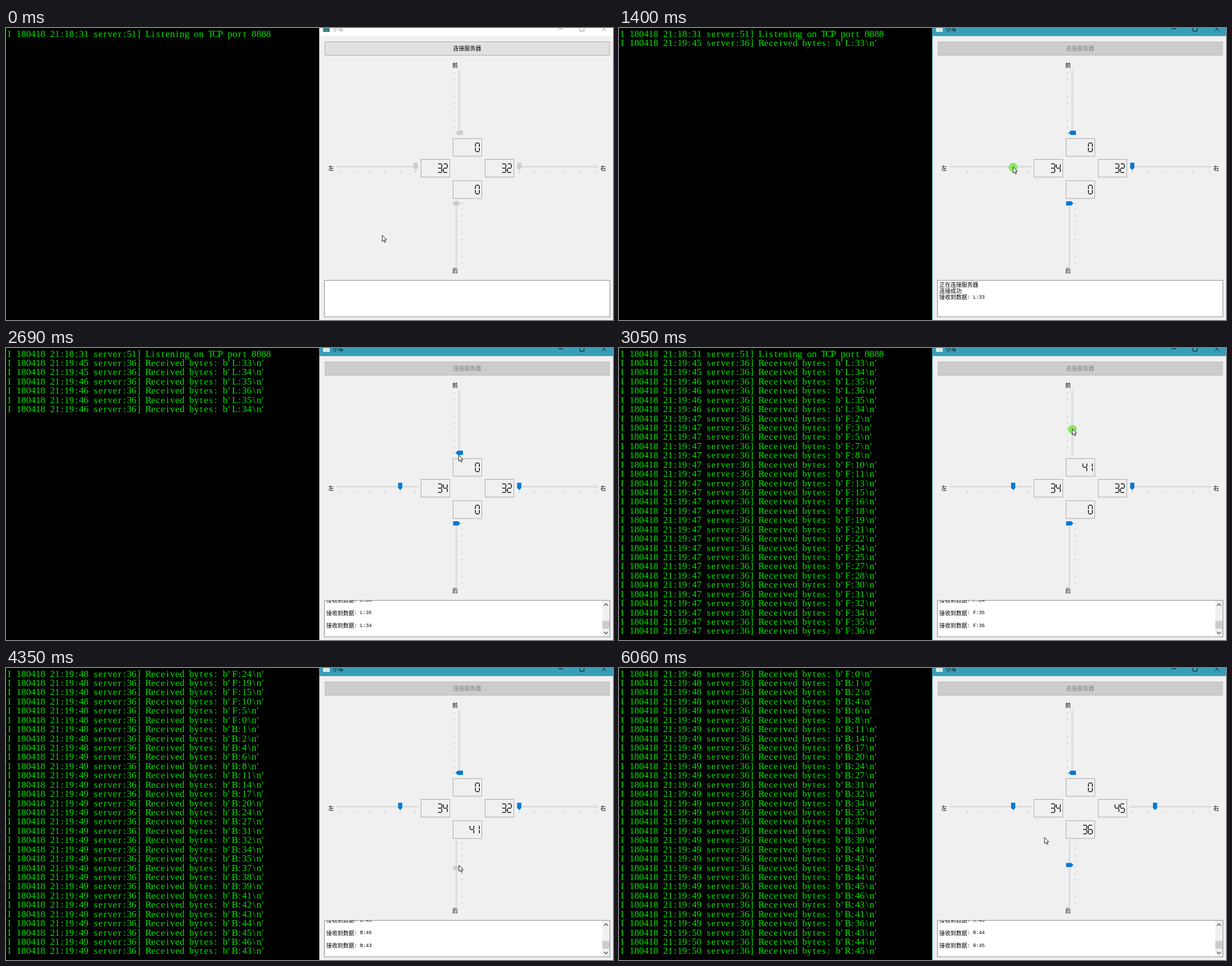
An HTML page with a canvas that plays this animation: 1080 by 519 pixels, repeating every 6.85 s.

```html
<!DOCTYPE html>
<html lang="zh">
<head>
<meta charset="utf-8">
<title>小车</title>
<style>
html, body { margin: 0; width: 100%; height: 100%; overflow: hidden; background: #000; }
canvas { display: block; width: 1080px; height: 519px; }
</style>
</head>
<body>
<canvas id="stage" width="1080" height="519"></canvas>
<script>
const g = document.getElementById('stage').getContext('2d');
const LOOP = 6850, STEP = 61.1, ROWS = 31, LAG = 55;
const CJK = '"Noto Sans CJK SC", "Noto Sans CJK", sans-serif';
const MONO = '"Liberation Mono", monospace';
const SERIF = '"Liberation Serif", serif';
const BLUE = '#0078d7';
const PRESSED = 420, CONNECTING = 480, CONNECTED = 540;

// x, y: handle at the base value; dir: way the value grows; unit: pixels per step
const sliders = {
  F: { x: 806.5, y: 186.3, dir: [0, -1], unit: 1.065, base: 0, side: -1, gap: 10.65, ticks: 11, lcd: [795, 196] },
  L: { x: 728.8, y: 246, dir: [-1, 0], unit: 13.7, base: 32, side: 1, gap: 27.3, ticks: 6, lcd: [738, 233] },
  R: { x: 913.2, y: 246, dir: [1, 0], unit: 3.12, base: 32, side: 1, gap: 27.1, ticks: 6, lcd: [852, 233] },
  B: { x: 802, y: 311.8, dir: [0, 1], unit: 1.065, base: 0, side: 1, gap: 10.65, ticks: 11, lcd: [795, 271], grab: [4, -4.6] }
};
function handleAt(s, v) {
  const d = s.unit * (v - s.base);
  return [s.x + s.dir[0] * d, s.y + s.dir[1] * d];
}

const easeIn = p => u => u ** p;
const easeOut = p => u => 1 - (1 - u) ** p;
const clock = t => 46 + Math.floor((t - 1540) / 757);

const events = [];
// Free pointer stops: time, x, y
const path = [
  [0, 669.5, 368.5], [183, 756, 51], [306, 756, 51], [367, 770, 40], [490, 774, 40], [611, 774, 111],
  [2680, 805, 191], [3600, 807, 322], [3670, 807, 322],
  [5400, 953.5, 247], [5680, 797, 258], [5880, 797, 258], [6045, 757, 301]
];

// One leg of a drag: n messages on the way to a value; the pointer follows the handle
function drag(ch, from, to, target, n, ease = easeIn(1)) {
  const s = sliders[ch], first = s.value ?? s.base;
  const follow = (t, v) => {
    const [x, y] = handleAt(s, v), [dx, dy] = s.grab || [0, 1];
    path.push([t, x + dx, y + dy]);
  };
  follow(from, first);
  for (let i = 1; i <= n; i++) {
    const t = from + (to - from) * i / n;
    const v = Math.round(first + (target - first) * ease(i / n));
    events.push({ t, ch, v });
    follow(t, v);
  }
  s.value = target;
  s.start ??= from;
  s.firstEnd ??= to;
  s.end = to;
}
drag('L', 1100, 1705, 36, 4);
drag('L', 2180, 2285, 34, 2);
drag('F', 2715, 3047, 41, 28, easeOut(1.13));
drag('F', 3250, 3530, 0, 10, easeIn(1.25));
drag('B', 3695, 4055, 31, 12, easeIn(1.5));
drag('B', 4055, 4215, 46, 12, easeOut(1.2));
drag('B', 4215, 4335, 41, 2, easeIn(0.8));
drag('B', 4335, 4397, 36, 1);
drag('R', 4710, 4830, 43, 1);
drag('R', 4830, 5130, 45, 2);
path.sort((a, b) => a[0] - b[0]);

function pointer(t) {
  const i = path.findIndex(p => p[0] > t);
  if (i < 0) return path[path.length - 1].slice(1);
  const [a, b] = [path[i - 1], path[i]], u = (t - a[0]) / (b[0] - a[0]);
  return [a[1] + (b[1] - a[1]) * u, a[2] + (b[2] - a[2]) * u];
}

function rect(x, y, w, h, fill) { g.fillStyle = fill; g.fillRect(x, y, w, h); }
function box(x, y, w, h, fill, edge) {
  rect(x, y, w, h, edge);
  rect(x + 1, y + 1, w - 2, h - 2, fill);
}
function text(s, x, y, font, fill, align = 'left', base = 'middle') {
  g.font = font; g.fillStyle = fill; g.textAlign = align; g.textBaseline = base;
  g.fillText(s, x, y);
}
function shape(points, fill) {
  g.beginPath();
  points.forEach(p => g.lineTo(p[0], p[1]));
  g.closePath();
  g.fillStyle = fill;
  g.fill();
}
function line(points, color, width = 1) {
  g.beginPath();
  points.forEach(p => g.lineTo(p[0], p[1]));
  g.strokeStyle = color; g.lineWidth = width;
  g.stroke();
}

const nudge = { '[': 2, "'": -2 };
function terminal(sent) {
  rect(0, 0, 558, 519, '#000');
  const lines = ['[I 180418 21:18:31 server:51] Listening on TCP port 8888'].concat(
    sent.map(e => `[I 180418 21:19:${clock(e.t)} server:36] Received bytes: b'${e.ch}:${e.v}\\n'`));
  lines.slice(-ROWS).forEach((s, row) => {
    [...s].forEach((c, i) => text(c, -7 + 8.54 * (i + 0.5) + (nudge[c] || 0), 15.5 + 16.43 * row,
      '17px ' + SERIF, '#00e600', 'center', 'alphabetic'));
  });
}

// Segments a to f run round six corners, g crosses the middle
const digits = ['abcdef', 'bc', 'abdeg', 'abcdg', 'bcfg', 'acdfg', 'acdefg', 'abc', 'abcdefg', 'abcdfg'];
const corner = i => [i > 0 && i < 4 ? 1 : 0, Math.round(1 - Math.cos((i - 0.5) * Math.PI / 3))];
function lcd([x, y], value) {
  box(x, y, 52, 32.5, '#f0f0f0', '#a8a8a8');
  const s = String(value);
  [...s].forEach((d, i) => {
    const left = x + 40.2 - (s.length - 1 - i) * 9.8, top = y + 8.5;
    for (const name of digits[d]) {
      const k = 'abcdefg'.indexOf(name);
      const ends = k === 6 ? [corner(5), corner(2)] : [corner(k), corner((k + 1) % 6)];
      const [[x1, y1], [x2, y2]] = ends.sort((a, b) => a[0] - b[0] || a[1] - b[1]);
      const cx = x1 === x2 ? 0 : 0.5, cy = y1 === y2 ? 0 : 0.9;
      line([[left + x1 * 7 + cx, top + y1 * 7.6 + cy], [left + x2 * 7 - cx, top + y2 * 7.6 - cy]], '#000', 1.4);
    }
  });
}

function slider(s, value, t, [mx, my]) {
  const [dx, dy] = s.dir, flat = dx !== 0;
  const far = flat ? 141 : 111, back = 5;
  const gx = flat ? Math.round(s.x - (dx > 0 ? back : far)) : Math.round(s.x - 1.8);
  const gy = flat ? 245 : Math.round(s.y - (dy > 0 ? back : far));
  box(gx, gy, flat ? far + back : 3, flat ? 3 : far + back, '#e7eaea', '#d6d6d6');
  for (let i = 0; i < s.ticks; i++) {
    const tx = Math.round(s.x - 0.5 + dx * s.gap * i), ty = Math.round(s.y - 0.5 + dy * s.gap * i);
    if (flat) rect(tx, 254, 1, 3, '#bcbcbc');
    else rect(Math.round(s.x + s.side * 9 - 1.5), ty, 3, 1, '#bcbcbc');
  }
  const [x, y] = handleAt(s, value);
  const [w, h] = flat ? [3.7, 6.5] : [6.5, 3.7];
  const held = t >= s.start && t < s.end + 30;
  const over = Math.abs(mx - x) < w && Math.abs(my - y) < h;
  g.save();
  g.translate(x, y);
  if (!flat) g.rotate(-s.side * Math.PI / 2);
  shape([[-3.7, -6.5], [3.7, -6.5], [3.7, 2.8], [0, 6.5], [-3.7, 2.8]],
    t < CONNECTED || held ? '#cccccc' : over ? '#171717' : BLUE);
  g.restore();
  lcd(s.lcd, value);
}

function titleBar(active) {
  const tone = active ? '#389eb7' : '#fff', ink = active ? '#111' : '#999';
  rect(557, 0, 1, 519, active ? '#389eb7' : '#aaa');
  rect(558, 0, 522, 14.4, tone);
  rect(564, 0, 12, 7, active ? '#d5e9e6' : '#3c8580');
  text('小车', 581, 2, '10px ' + CJK, ink);
  line([[983, 1.5], [991, 1.5]], ink);
  line([[1021, -2], [1021, 5.5], [1028.5, 5.5], [1028.5, -2]], ink);
  line([[1060, -2], [1067.5, 5.5]], ink);
  line([[1067.5, -2], [1060, 5.5]], ink);
}

function button(t, my) {
  let look = ['#e1e1e1', '#adadad', '#000'];
  if (t >= CONNECTING) look = ['#cccccc', '#bfbfbf', '#838383'];
  else if (t >= PRESSED) look = ['#cce4f7', '#005499', '#000'];
  else if (my < 48) look = ['#e5f1fb', BLUE, '#000'];
  box(567, 24, 507.5, 25, look[0], look[1]);
  text('连接服务器', 820.5, 36.5, '10px ' + CJK, look[2], 'center');
}

function logBox(t, sent) {
  const focused = t >= CONNECTING && t < sliders.L.start;
  box(566, 448, 509, 66, '#fff', focused ? BLUE : '#8a8d92');
  g.save();
  g.beginPath();
  g.rect(567, 449, 507, 64);
  g.clip();
  const pitch = 11.2, n = sent.length;
  const top = n > 1 ? 493.5 - pitch * 2 * n : 456;
  const put = (s, y) => text(s, 570, y, '9.9px ' + CJK, '#000');
  if (t >= CONNECTING) put('正在连接服务器', top);
  if (t >= CONNECTED) put('连接成功', top + pitch);
  sent.forEach((e, i) => {
    const y = top + pitch * (2 + 2 * i);
    put('接收到数据', y);
    text(`: ${e.ch}:${e.v}`, 619.5, y, '8.7px ' + MONO, '#000');
  });
  if (n > 1) {
    const thumb = Math.max(14, 35 * 64 / (pitch * (2 + 2 * n)));
    rect(1061, 449, 13, 64, '#f0f0f0');
    rect(1061, 499 - thumb, 13, thumb, '#cdcdcd');
    for (const [y, d] of [[458, -3.5], [504.5, 3.5]])
      line([[1064, y], [1067.5, y + d], [1071, y]], '#505050', 1.4);
  }
  g.restore();
}

// The press highlight stays for the first leg of a drag, then fades
const presses = [[PRESSED, CONNECTING]].concat(Object.values(sliders).map(s => [s.start, s.firstEnd + 70]));
function arrow(t, [x, y]) {
  for (const [from, to] of presses) {
    const u = Math.max(0, (t - to) / 180);
    if (t < from || u >= 1) continue;
    g.beginPath();
    g.arc(x, y + 1, 8 + 4 * u, 0, 7);
    g.fillStyle = `rgba(118,232,66,${0.78 * (1 - u)})`;
    g.fill();
  }
  const pts = [[0, 0], [0, 11], [2.6, 8.7], [4.3, 12.6], [6, 11.9], [4.4, 8], [7.7, 8]]
    .map(p => [x + p[0], y + p[1]]);
  shape(pts, '#fff');
  line([...pts, pts[0]], '#222');
}

function draw(t) {
  const mouse = pointer(t);
  const sent = events.filter(e => e.t + LAG <= t);
  terminal(sent);
  rect(558, 0, 522, 519, '#f0f0f0');
  titleBar(t >= PRESSED);
  button(t, mouse[1]);
  for (const [s, x, y] of [['前', 799, 66], ['后', 799, 431], ['左', 578.5, 249.5], ['右', 1062.5, 249.5]])
    text(s, x, y, '10px ' + CJK, '#000', 'center');
  for (const ch in sliders) {
    const s = sliders[ch];
    const last = events.filter(e => e.ch === ch && e.t <= t).pop();
    // A handle let go for a while is no longer held
    slider(s, last ? last.v : s.base, t, mouse);
  }
  logBox(t, sent);
  arrow(t, mouse);
}

let shown = -1;
const start = performance.now();
function tick() {
  const t = (performance.now() - start) % LOOP;
  const k = Math.floor((t + 14) / STEP);
  if (k !== shown) draw((shown = k) * STEP);
  requestAnimationFrame(tick);
}
tick();
</script>
</body>
</html>
```
